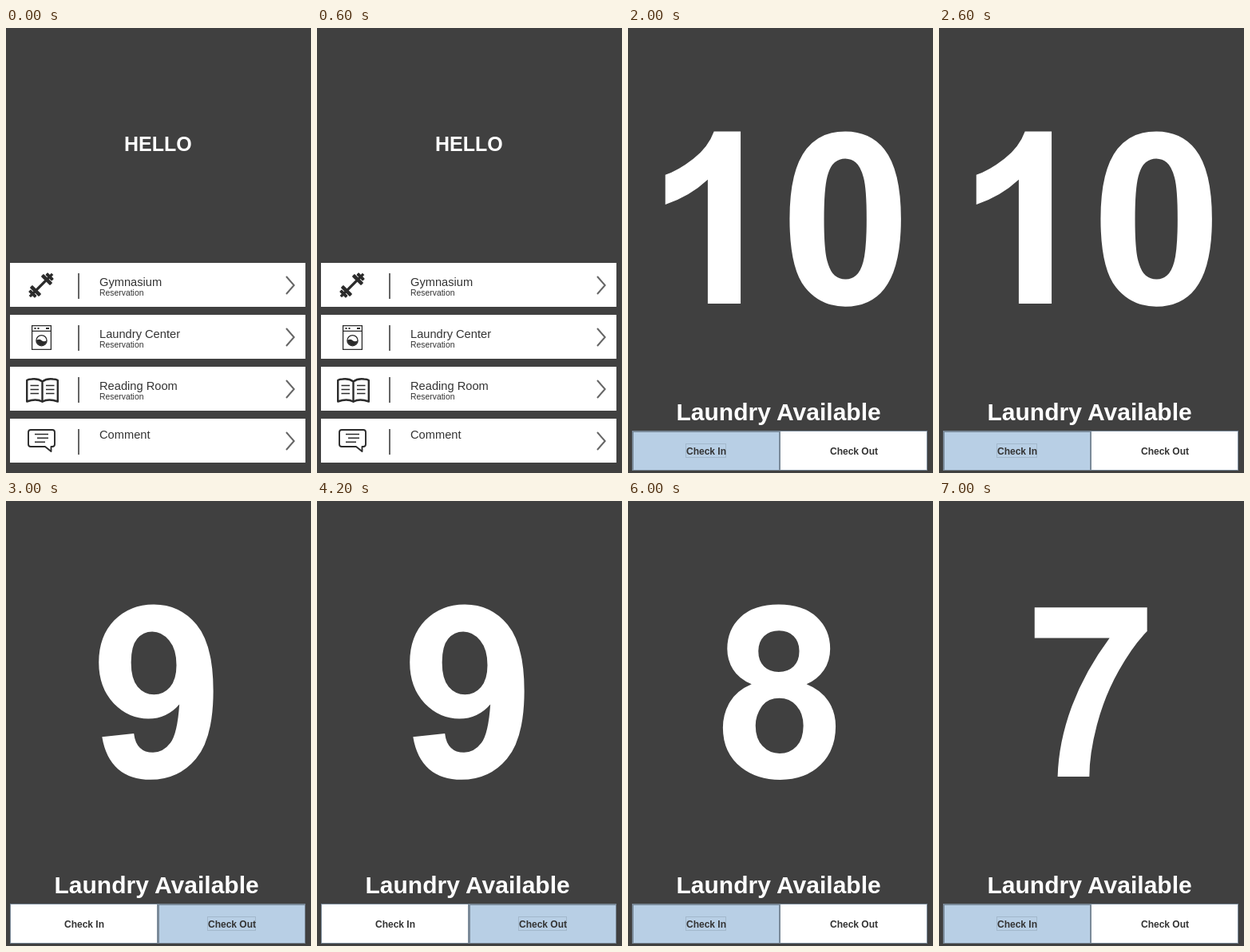
An HTML page for the animation above (8000 ms loop, 382 by 557 pixels).

```html
<!DOCTYPE html>
<html lang="en">
<head>
<meta charset="utf-8">
<title>Laundry counter</title>
<style>
  html, body { margin: 0; width: 100%; height: 100%; overflow: hidden; background: #404040; }
  svg { display: block; width: 100%; height: 100%; }
  text { font-family: Arial, "Liberation Sans", sans-serif; }
  .heading { font-weight: bold; fill: #fff; }
  .label { font-size: 12px; font-weight: bold; fill: #333; }
  .line { fill: none; stroke: #2b2b2b; }
</style>
</head>
<body>
<svg id="stage" viewBox="0 0 382 557">
  <rect width="382" height="557" fill="#404040"/>
  <g id="menu">
    <text class="heading" x="148" y="154" font-size="25">HELLO</text>
    <g id="rows"></g>
    <g transform="translate(44 322) rotate(-45)" fill="#2b2b2b">
      <rect x="-20" y="-1.7" width="40" height="3.4"/>
      <rect x="-12.2" y="-8" width="4.6" height="16" rx="1"/>
      <rect x="7.6" y="-8" width="4.6" height="16" rx="1"/>
      <rect x="-17" y="-5.6" width="4" height="11.2" rx="1"/>
      <rect x="13" y="-5.6" width="4" height="11.2" rx="1"/>
    </g>
    <g class="line" stroke-width="1.3">
      <path d="M32.6 372.7H56.4V402.3H32.6ZM32.6 379.3H56.4"/>
      <circle cx="44.5" cy="391.2" r="6.6"/>
      <path d="M38 391Q41.5 388.5 44.5 391T51 391A6.5 6.5 0 0 1 38 391Z" fill="#2b2b2b" stroke="none"/>
      <path d="M35.5 376H37.5M39.5 376H41.5M50 376H54" stroke-width="1.8"/>
    </g>
    <g class="line" stroke-width="2.4" stroke-linejoin="round">
      <path d="M45.5 442.5Q40 438.5 32 439.5Q28 439.5 26.2 441V467.5Q38 463.5 45.5 467.8Q53 463.5 64.8 467.5V441Q63 439.5 59 439.5Q51 438.5 45.5 442.5V467.8"/>
      <path d="M30.5 447.5H41M30.5 452.5H41M30.5 457.5H41M50 447.5H60.5M50 452.5H60.5M50 457.5H60.5" stroke-width="1.5"/>
    </g>
    <g class="line" stroke-width="1.9" stroke-linejoin="round">
      <path d="M31 503H58Q61 503 61 506V521Q61 524 58 524H56.5V530L49 524H31Q28 524 28 521V506Q28 503 31 503Z"/>
      <path d="M36 508.5H53M39 513.3H53M36 518.2H49" stroke-width="1.5"/>
    </g>
  </g>
  <g id="counter">
    <g id="digits" fill="#fff" role="img"></g>
    <text class="heading" x="60.5" y="491" font-size="30">Laundry Available</text>
    <g id="buttons"></g>
  </g>
</svg>
<script>
const $ = id => document.getElementById(id);
const LOOP = 8000;
const DARK = "#7a8a99", LIGHT = "#b8cfe5", FOCUS = "#a3b8cc";

// Bold numerals, 2048 units per em, y upwards
const GLYPHS = {
  1: "M806 0H525V1059Q371 915 162 846V1101Q272 1137 401 1237.5T578 1472H806Z",
  0: "M562 1472Q775 1472 895 1320Q1038 1140 1038 723Q1038 307 894 125Q775 -25 562 -25Q348 -25 217 139.5T86 726Q86 1140 230 1322Q349 1472 562 1472Z" +
     "M562 1239Q511 1239 471 1206.5T409 1090Q380 981 380 723T406 368.5T471.5 241T562 208T653 240.5T715 357Q744 465 744 723T718 1077.5T652.5 1205.5T562 1239Z",
  9: "M91 339L363 369Q373 286 415 246T526 206Q613 206 674 286T752 618Q646 495 487 495Q314 495 188.5 628.5T63 976Q63 1199 195.5 1335.5T533 1472Q756 1472 899 1299.5T1042 732Q1042 330 893 152T505 -26Q333 -26 227 65.5T91 339Z" +
     "M727 953Q727 1089 664.5 1164T520 1239Q442 1239 390.5 1177.5T339 976Q339 834 395 767.5T535 701Q616 701 671.5 765T727 953Z",
  8: "M326 790Q217 836 167.5 916.5T118 1093Q118 1257 232.5 1364T558 1471Q767 1471 882.5 1364T998 1093Q998 991 945 911.5T796 790Q918 741 981.5 647T1045 430Q1045 227 915.5 100T571 -27Q371 -27 238 78Q81 202 81 418Q81 537 140 636.5T326 790Z" +
     "M384 1073Q384 989 431.5 942T558 895Q638 895 686 942.5T734 1074Q734 1153 686.5 1200.5T561 1248Q480 1248 432 1200T384 1073Z" +
     "M360 437Q360 326 419 262T566 198Q654 198 711 259T769 436Q769 540 711 605T564 670Q461 670 410.5 596T360 437Z",
  7: "M87 1185V1446H1049V1242Q930 1125 807 906T619.5 440.5T555 0H284Q292 292 403.5 595T728 1185Z"
};

const MENU = [["Gymnasium", true], ["Laundry Center", true], ["Reading Room", true], ["Comment", false]];
const STATES = [
  { at: 0 },
  { at: 1000, count: 10, left: "hover" },
  { at: 2000, count: 10, left: "pressed" },
  { at: 3000, count: 9, right: "pressed" },
  { at: 5000, count: 9, left: "pressed" },
  { at: 6000, count: 8, left: "pressed" },
  { at: 7000, count: 7, left: "pressed" }
];

const box = (x, y, w, h, fill) => `<rect x="${x}" y="${y}" width="${w}" height="${h}" fill="${fill}"/>`;
const frame = (x, y, w, h, color) =>
  `<rect x="${x + .5}" y="${y + .5}" width="${w - 1}" height="${h - 1}" fill="none" stroke="${color}"/>`;

function menuRow([title, reservable], i) {
  const y = 294 + 65 * i;
  return box(5, y, 370, 55, "#fff") + box(90.1, y + 13, 1.8, 32, "#555") +
    `<path d="M351 ${y + 17}L360.7 ${y + 28}L351 ${y + 39}" fill="none" stroke="#666" stroke-width="2"/>` +
    `<text x="117" y="${y + (reservable ? 28.5 : 24.5)}" font-size="14.67" fill="#333">${title}</text>` +
    (reservable ? `<text x="117" y="${y + 40.5}" font-size="10.4" fill="#333">Reservation</text>` : "");
}

function button(x, label, textX, textW, mode) {
  const y = 504, w = 185, h = 50, pressed = mode === "pressed";
  let s = box(x, y, w, h, pressed ? LIGHT : "#fff");
  if (mode === "hover") {
    s += frame(x, y, w, h, LIGHT) + frame(x + 1, y + 1, w - 2, h - 2, DARK) + frame(x + 2, y + 2, w - 4, h - 4, LIGHT);
  } else {
    s += frame(x, y, w, h, DARK);
    if (pressed) s += box(x, y, w, 2, DARK) + box(x, y, 2, h, DARK);
  }
  if (mode) s += frame(textX - 1, 520, textW + 1, 18, FOCUS);
  return s + `<text class="label" x="${textX}" y="534">${label}</text>`;
}

function drawCount(count) {
  const chars = [...String(count)];
  const start = chars.length > 1 ? 23 : 107;
  $("digits").setAttribute("aria-label", count);
  $("digits").innerHTML = chars.map((c, i) =>
    `<path transform="translate(${start + i * 166.85} 345) scale(${300 / 2048} ${-300 / 2048})" fill-rule="evenodd" d="${GLYPHS[c]}"/>`
  ).join("");
}

let shown;
function render(ms) {
  const state = STATES.findLast(s => s.at <= ms);
  if (state === shown) return;
  shown = state;
  const counting = state.count !== undefined;
  $("menu").style.display = counting ? "none" : "";
  $("counter").style.display = counting ? "" : "none";
  if (!counting) return;
  drawCount(state.count);
  $("buttons").innerHTML =
    button(5, "Check In", 73, 50, state.left) + button(190, "Check Out", 253, 60, state.right);
}

$("rows").innerHTML = MENU.map(menuRow).join("");
const begin = performance.now();
function tick() {
  render((performance.now() - begin) % LOOP);
  requestAnimationFrame(tick);
}
tick();
</script>
</body>
</html>
```
